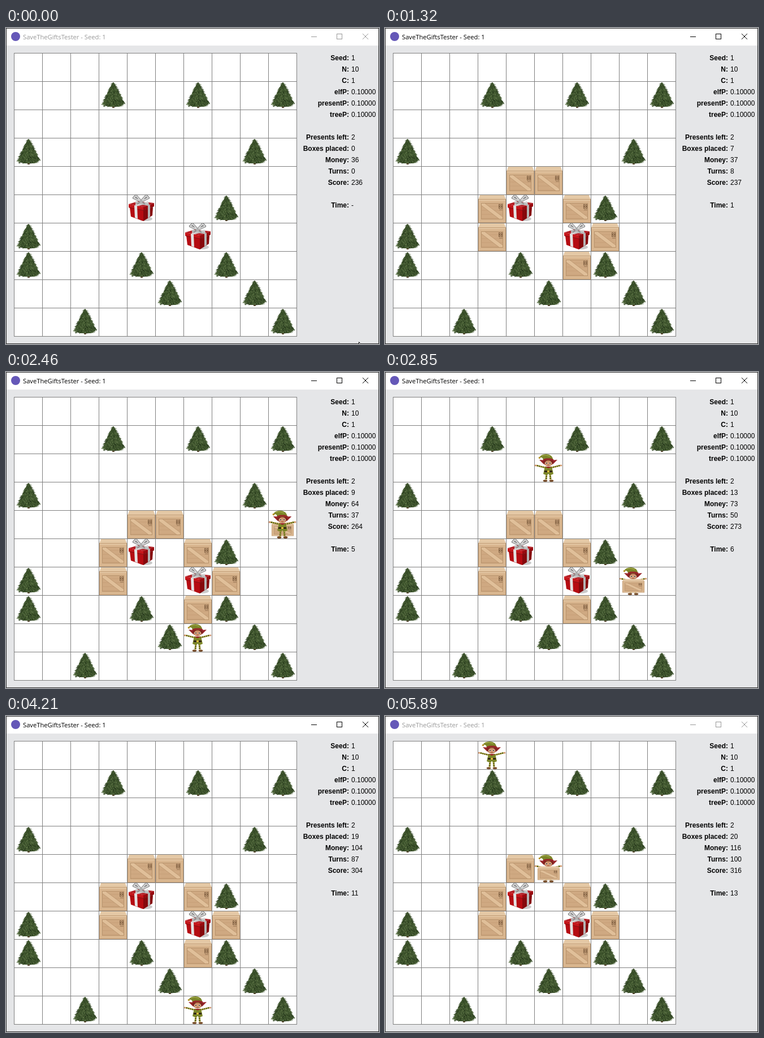
These frames come from a looping animation (660x558 px, 6020 ms). An HTML page with a canvas:

```html
<!DOCTYPE html>
<html lang="en">
<head>
<meta charset="utf-8">
<title>SaveTheGiftsTester</title>
<style>
html, body { margin: 0; width: 100%; height: 100%; overflow: hidden; background: #e5e6e8; }
canvas { display: block; width: 660px; height: 558px; }
</style>
</head>
<body>
<canvas id="stage" width="660" height="558"></canvas>
<script>
const LOOP = 6020, CELL = 50, LEFT = 14, TOP = 44, N = 10;
const ctx = document.getElementById('stage').getContext('2d');

// T tree, G gift, B box, a-g gates where elves come in
const MAP = [
  '..g..f....',
  '...T..T..T',
  '.........a',
  'T.......T.',
  '....BB...c',
  '...BG.BT..',
  'T..B..GB.e',
  'T...T.BT..',
  '.....T..T.',
  '.dT...b..T'
];
// Turns on which an elf enters at each gate
const VISITS = { a: [9, 27], b: [36, 58, 70, 87], c: [37, 76, 96], d: [38, 67], e: [40, 47], f: [48], g: [99] };
const STEP = { U: [-1, 0], D: [1, 0], L: [0, -1], R: [0, 1] };

const at = ([r, c]) => (MAP[r] || '')[c];
function find(kind) {
  const found = [];
  MAP.forEach((line, r) => [...line].forEach((k, c) => k === kind && found.push([r, c])));
  return found;
}
const TREES = find('T'), GIFTS = find('G'), BOXES = find('B');

// Shortest walk from a cell to the first one that passes the test
function walk(from, order, done) {
  const queue = [[from]], seen = new Set([String(from)]);
  for (const path of queue) {
    const here = path[path.length - 1];
    if (done(here)) return path;
    if (path.length > 1 && 'TGB'.includes(at(here))) continue;
    for (const d of order) {
      const next = [here[0] + STEP[d][0], here[1] + STEP[d][1]];
      if (!at(next) || seen.has(String(next))) continue;
      seen.add(String(next));
      queue.push([...path, next]);
    }
  }
}
const onEdge = p => !'TGB'.includes(at(p)) && p.some(v => v === 0 || v === N - 1);

// Each elf takes the nearest box and leaves by the nearest edge
const ELVES = Object.entries(VISITS).flatMap(([gate, turns]) => {
  const into = walk(find(gate)[0], 'LURD', p => at(p) === 'B');
  const target = into[into.length - 1];
  const path = [...into, ...walk(target, 'DRUL', onEdge).slice(1)];
  return turns.map(start => ({ start, path, target: String(target), grab: start + into.length - 1 }));
});

// The screen refreshes every 64 ms or so; turns pass at a slightly uneven pace
function turnAt(t) {
  const k = Math.min(57, Math.floor((t - 1060) / 63.9));
  return k < 0 ? 0 : Math.floor(1.6 + 1.737 * k - 0.5 * Math.sin(k / 10));
}

function random(seed) {
  return () => (seed = (seed * 16807) % 2147483647) / 2147483647;
}

// Drawing helpers
function trace(g, p) {
  g.beginPath();
  for (let i = 0; i < p.length; i += 2) g.lineTo(p[i], p[i + 1]);
}
function poly(g, color, ...p) {
  trace(g, p);
  g.fillStyle = color;
  g.fill();
}
function line(g, color, width, ...p) {
  trace(g, p);
  g.strokeStyle = color;
  g.lineWidth = width;
  g.stroke();
}
function oval(g, color, x, y, rx, ry = rx) {
  g.fillStyle = color;
  g.beginPath();
  g.ellipse(x, y, rx, ry, 0, 0, Math.PI * 2);
  g.fill();
}
function rect(g, color, x, y, w, h) {
  g.fillStyle = color;
  g.fillRect(x, y, w, h);
}
function frame(g, color, x, y, w, h) {
  g.strokeStyle = color;
  g.lineWidth = 1;
  g.strokeRect(x + 0.5, y + 0.5, w - 1, h - 1);
}
function sprite(paint) {
  const c = document.createElement('canvas');
  c.width = c.height = CELL + 1;
  paint(c.getContext('2d'));
  return c;
}

const tree = sprite(g => {
  const rnd = random(77), shades = ['#22331a', '#314624', '#415930', '#536b3e', '#6d8254'];
  const half = y => 20 * Math.min(1, ((y - 1) / 37) ** 0.85, (50 - y) / 10);
  rect(g, '#54452f', 24, 43, 4, 4);
  for (let y = 2; y < 45; y++) rect(g, '#3a5029', 26 - half(y) * 0.9, y, half(y) * 1.8, 1);
  for (let i = 0; i < 520; i++) {
    const y = 2 + 41 * Math.sqrt(rnd()), u = rnd() * 2 - 1, x = 26 + u * half(y) * 0.92;
    line(g, shades[Math.floor(rnd() * 5)], 0.8, x, y, x + u * 3, y + 1 + rnd() * 2);
  }
});

const gift = sprite(g => {
  oval(g, 'rgba(80,80,80,.3)', 33, 43, 12, 4);
  poly(g, '#b50c12', 5, 23, 29, 28, 29, 47, 7, 39);
  poly(g, '#86080c', 29, 28, 46, 22, 45, 37, 29, 47);
  poly(g, '#b31b21', 3, 17, 20, 12, 48, 15, 29, 22);
  poly(g, '#c5161b', 3, 17, 29, 22, 29, 28, 3, 23);
  poly(g, '#9a0a0f', 29, 22, 48, 15, 48, 21, 29, 28);
  line(g, '#6d0608', 0.8, 4, 23, 29, 28, 47, 21);
  poly(g, '#e3e3e3', 13, 19, 18, 20, 19, 43, 14, 41);
  poly(g, '#b5b5b5', 37, 19, 41, 18, 41, 39, 37, 42);
  line(g, '#d6d6d6', 4, 15, 19, 38, 14);
  line(g, '#bdbdbd', 4, 15, 14, 39, 18);
  g.lineJoin = 'round';
  for (const side of [-1, 1]) {
    const loop = [25, 12, 25 + side * 9, 2, 25 + side * 13, 6, 25, 12];
    line(g, '#707070', 4, ...loop);
    line(g, '#d8d8d8', 2.2, ...loop);
    line(g, '#8c8c8c', 2, 25, 12, 25 + side * 7, 17);
  }
  oval(g, '#b0b0b0', 25, 12, 3, 2.5);
});

const crate = sprite(g => {
  const seam = '#b8936c';
  poly(g, '#e4c8a5', 4, 1, 47, 1, 50, 9, 1, 9);
  rect(g, '#d9b68f', 1, 8, 49, 42);
  rect(g, '#cfa982', 6, 15, 39, 29);
  for (let y = 21; y < 44; y += 7) line(g, '#c39c74', 0.7, 6, y, 45, y);
  poly(g, '#e0bf99', 6, 15, 12, 15, 45, 40, 45, 44, 39, 44, 6, 19);
  line(g, seam, 0.8, 12, 15, 45, 40);
  line(g, seam, 0.8, 6, 19, 39, 44);
  frame(g, seam, 6, 15, 39, 29);
  frame(g, '#c09b74', 1, 8, 49, 42);
  line(g, '#ecd5b5', 1, 2, 10, 49, 10);
  for (let i = 0; i < 4; i++) frame(g, '#856445', 37 + i % 2 * 4, 17 + (i >> 1) * 4, 3, 4);
  line(g, '#856445', 0.8, 38, 27, 44, 27);
});

function stripes(g, x0, y0, x1, y1, width) {
  line(g, '#c3b548', width, x0, y0, x1, y1);
  g.setLineDash([1.8, 1.6]);
  line(g, '#475019', width, x0, y0, x1, y1);
  g.setLineDash([]);
}

const makeElf = loaded => sprite(g => {
  const skin = '#d0946c', red = '#982428', green = '#7c8629', mid = 25;
  for (const s of [-1, 1]) {
    stripes(g, mid + s * 5, 25, mid + s * 21, 21, 2.5);
    oval(g, skin, mid + s * 22.5, 21, 1.8, 1.5);
    stripes(g, mid + s * 3, 36, mid + s * 4, 46, 3);
    oval(g, '#714520', mid + s * 5.5, 48, 3.8, 1.8);
    poly(g, red, mid + s * 5, 12, mid + s * 16, 11, mid + s * 8, 19);
  }
  poly(g, green, 19, 23, 31, 23, 34, 36, 29, 38, 25, 36, 21, 38, 16, 36);
  poly(g, red, 19, 23, 31, 23, 25, 26);
  rect(g, '#342a17', 18, 30, 14, 3);
  rect(g, '#dfbd3a', 23, 30, 4, 3);
  oval(g, '#7c2420', mid, 14.5, 9, 7.5);
  oval(g, skin, mid, 17.5, 6.5, 5);
  for (const s of [-1, 1]) {
    oval(g, '#ffffff', mid + s * 3, 17, 1.6);
    oval(g, '#2b2118', mid + s * 3, 17, 1.1);
  }
  line(g, '#8f382e', 0.8, 23, 20.5, 25, 21, 27, 20.5);
  g.fillStyle = green;
  g.beginPath();
  g.moveTo(16, 12);
  g.quadraticCurveTo(16, 6, 9, 7);
  g.quadraticCurveTo(12, 1, 21, 1);
  g.quadraticCurveTo(32, 1, 34, 12);
  g.fill();
  line(g, '#a5ae4b', 1.2, 13, 4, 20, 2.5, 28, 5);
  line(g, red, 3, 16, 12, 21, 10, 29, 10, 34, 12);
  oval(g, '#b7962f', 9.5, 7.5, 1.8);
  if (loaded) g.drawImage(crate, 5, 21, 41, 25);
});
const elf = makeElf(false), elfLoaded = makeElf(true);

function put(image, [r, c]) {
  ctx.drawImage(image, LEFT + c * CELL, TOP + r * CELL);
}

function write(text, x, y, font, color, align = 'left') {
  ctx.font = font;
  ctx.fillStyle = color;
  ctx.textAlign = align;
  ctx.fillText(text, x, y);
}

function drawWindow(focus) {
  rect(ctx, '#e5e6e8', 0, 0, 660, 558);
  rect(ctx, '#ffffff', 0, 0, 660, 31);
  const v = Math.round(153 * (1 - focus)), ink = `rgb(${v},${v},${v})`;
  oval(ctx, '#6558b8', 17, 15, 8);
  write('SaveTheGiftsTester - Seed: 1', 30, 20, '11.2px "Open Sans", sans-serif', ink);
  rect(ctx, ink, 540, 15, 10, 1);
  frame(ctx, ink, 585, 10, 10, 10);
  line(ctx, ink, 1, 631, 10, 641, 20);
  line(ctx, ink, 1, 641, 10, 631, 20);
  frame(ctx, '#303030', 0, 0, 660, 558);
}

function drawBoard(turn) {
  const size = N * CELL;
  rect(ctx, '#ffffff', LEFT, TOP, size, size);
  for (let i = 0; i <= N; i++) {
    rect(ctx, '#808080', LEFT + i * CELL, TOP, 1, size + 1);
    rect(ctx, '#808080', LEFT, TOP + i * CELL, size + 1, 1);
  }
  TREES.forEach(p => put(tree, p));
  GIFTS.forEach(p => put(gift, p));
  BOXES.forEach((p, i) => {
    const taken = ELVES.some(e => e.target === String(p) && turn >= e.grab && turn < e.grab + 2);
    if (turn > i && !taken) put(crate, p);
  });
  for (const e of ELVES) {
    const cell = e.path[turn - e.start];
    if (cell) put(turn >= e.grab ? elfLoaded : elf, cell);
  }
}

function drawStats(turn) {
  const replaced = ELVES.filter(e => turn >= e.grab + 2).length;
  const placed = Math.min(turn, BOXES.length) + replaced;
  const money = 36 + turn - placed;
  const rows = [
    ['Seed', 1], ['N', N], ['C', 1],
    ['elfP', '0.10000'], ['presentP', '0.10000'], ['treeP', '0.10000'], null,
    ['Presents left', GIFTS.length], ['Boxes placed', placed], ['Money', money],
    ['Turns', turn], ['Score', money + 100 * GIFTS.length], null,
    ['Time', turn ? Math.floor(0.13 * turn + 0.4) : '-']
  ];
  const face = '12px "Liberation Sans", Arial, sans-serif';
  rows.forEach((row, i) => {
    if (!row) return;
    write(row[0] + ':', 607, 57 + i * 20, 'bold ' + face, '#000', 'right');
    write(row[1], 611, 57 + i * 20, face, '#000');
  });
}

function drawCursor(t) {
  if (t >= 780) return;
  const u = t < 50 ? 0 : Math.min(5, 1 + Math.floor((t - 50) / 57.5)) / 5;
  const ease = u * u * (3 - 2 * u);
  ctx.save();
  ctx.translate(t >= 710 ? 633 : Math.round(624 + 6 * ease), Math.round(554 - 55 * ease));
  const arrow = [0.5, 0.5, 0.5, 16.5, 4, 13, 6.5, 18.5, 9, 17.5, 6.5, 12, 11.5, 12];
  poly(ctx, '#ffffff', ...arrow);
  line(ctx, '#000000', 1, ...arrow, 0.5, 0.5);
  ctx.restore();
}

function draw(t) {
  const turn = turnAt(t);
  drawWindow(t < 460 || t >= 5890 ? 0 : t < 530 ? 0.5 : 1);
  drawBoard(turn);
  drawStats(turn);
  drawCursor(t);
}

const begin = performance.now();
function tick() {
  draw((performance.now() - begin) % LOOP);
  requestAnimationFrame(tick);
}
tick();
</script>
</body>
</html>
```
